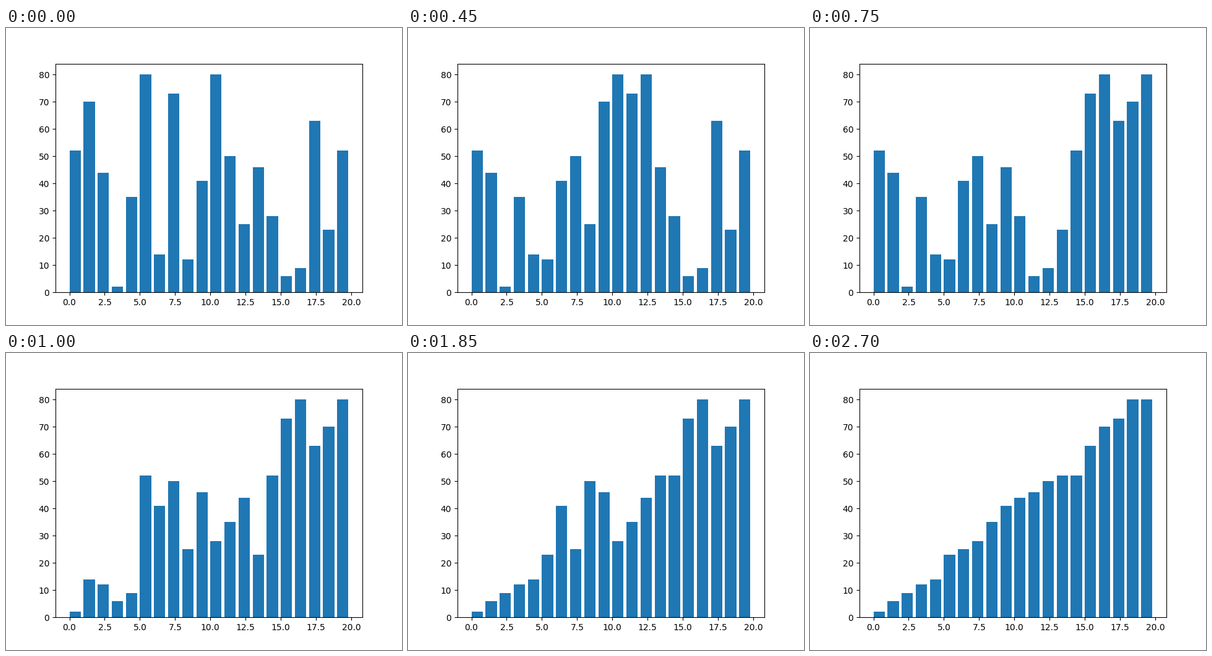
Write a matplotlib script that moves like this. It is 640x480 px and loops after 2850 ms.

```python
import matplotlib.pyplot as plt
from matplotlib.animation import FuncAnimation

# Unsorted input; every later state follows from the sort.
HEIGHTS = [52, 70, 44, 2, 35, 80, 14, 73, 12, 41,
           80, 50, 25, 46, 28, 6, 9, 63, 23, 52]
STEP_MS = 50


def quicksort(a, lo, hi):
    """Sort in place with a last-element pivot, yielding after every swap."""
    if lo >= hi:
        return
    pivot, store = a[hi], lo
    for j in range(lo, hi):
        if a[j] <= pivot:
            a[store], a[j] = a[j], a[store]
            store += 1
            yield a.copy()
    a[store], a[hi] = a[hi], a[store]
    yield a.copy()
    yield from quicksort(a, lo, store - 1)
    yield from quicksort(a, store + 1, hi)


states = [HEIGHTS, *quicksort(HEIGHTS.copy(), 0, len(HEIGHTS) - 1)]

fig, ax = plt.subplots(figsize=(6.4, 4.8), dpi=100)
bars = ax.bar(range(len(HEIGHTS)), HEIGHTS, align="edge")


def update(step):
    for bar, height in zip(bars, states[step]):
        bar.set_height(height)
    return bars


anim = FuncAnimation(fig, update, frames=len(states), interval=STEP_MS,
                     repeat=True, repeat_delay=0)
plt.show()
```
